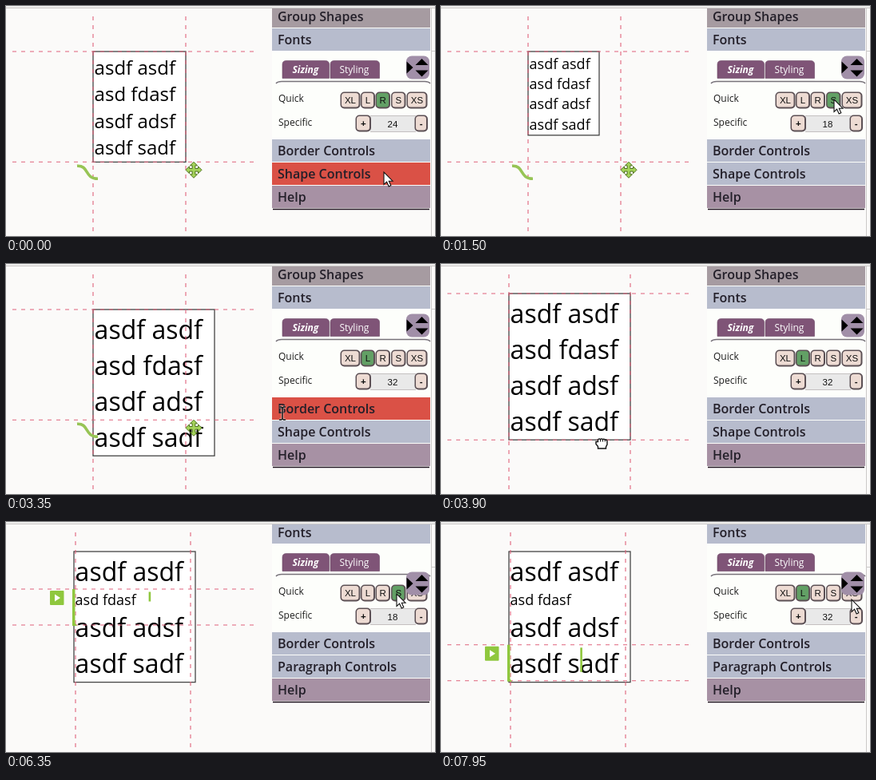
These frames come from a looping animation (537 px wide and 288 px high, 8 s). An HTML page:

```html
<!DOCTYPE html>
<html lang="en">
<head>
<meta charset="utf-8">
<title>Text sizing</title>
<style>
html, body { margin: 0; width: 100%; height: 100%; overflow: hidden; background: #fbfaf9; }
svg { display: block; width: 537px; height: 288px; font-family: "Open Sans", sans-serif; }
text { white-space: pre; }
.head { font-size: 16px; font-weight: 600; fill: #231f29; }
.label { font-size: 12px; fill: #1c1c1c; }
.tab { font-size: 12px; fill: #fff; }
.btn { font: 11.5px "Liberation Sans", Arial, sans-serif; text-anchor: middle; fill: #111; }
.guide { stroke: #e0637c; stroke-width: 1.1; stroke-dasharray: 5 6; fill: none; }
</style>
</head>
<body>
<svg id="stage" viewBox="0 0 537 288">
  <rect width="537" height="288" fill="#fbfaf9"/>
  <rect id="box" fill="#fff" stroke="#454545" stroke-width="1.3"/>
  <g id="lines"></g>
  <g id="guides"></g>
  <path id="curve" d="M-20 5C-5 4 -11 21 6 21" fill="none" stroke="#97c455" stroke-width="3.6"/>
  <path id="move" d="M0-10L4.5-5.5H1.8V-1.8H5.5V-4.5L10 0L5.5 4.5V1.8H1.8V5.5H4.5L0 10L-4.5 5.5H-1.8V1.8H-5.5V4.5L-10 0L-5.5-4.5V-1.8H-1.8V-5.5H-4.5Z"
    fill="#a5d45a" stroke="#4d6f1c" stroke-width="1"/>
  <g id="mark" fill="#8fc73e">
    <path d="M83 0H86.5V43L89 46H83Z"/>
    <rect x="55" y="2" width="17.5" height="18" rx="1"/>
    <path d="M61 6.5L68 11L61 15.500Z" fill="#fff"/>
  </g>
  <rect id="caret" width="2.6" fill="#8fc73e"/>

  <g id="panel"></g>
  <g id="widget">
    <rect x="501" y="62.500" width="29" height="29" rx="7" fill="#a18fa8"/>
    <path d="M501.500 69.500L509.500 77L501.500 84.500ZM512.500 74L520.500 66L528.500 74ZM512.500 80.500H528.500L520.500 88.500Z" fill="#000"/>
  </g>

  <rect width="537" height="2" fill="#f1f0ef"/>
  <path d="M0 2.500H537M532.500 3V288M533 56.500H537" stroke="#cbc9c8" fill="none"/>

  <g id="arrow"><path d="M0 0V15.500L3.600 12.200L6.200 18L8.800 16.800L6.300 11.200H11Z" fill="#fff" stroke="#111" stroke-width="1.1"/></g>
  <g id="beam" fill="none">
    <path d="M-4-8H-1.500L0-7L1.500-8H4M0-7V7M-4 8H-1.500L0 7L1.500 8H4" stroke="#fff" stroke-width="3" opacity=".6"/>
    <path d="M-4-8H-1.500L0-7L1.500-8H4M0-7V7M-4 8H-1.500L0 7L1.500 8H4" stroke="#111" stroke-width="1.5"/>
  </g>
  <g id="hand">
    <path d="M-4.500 6V3.500L-7 0.500V-2.500H-4.500V-5Q-3-7-1.500-5.300Q0-7 1.500-5.300Q3-6.500 4.300-4.800Q7-5.500 7-2.500V1L5.500 4V6Z" fill="#fff" stroke="#111" stroke-width="1.4"/>
    <path d="M-1.500-5V-2.500M1.500-5V-2.500M4.300-4.500V-2.500" stroke="#111"/>
  </g>
</svg>
<script>
const $ = id => document.getElementById(id);
const NS = "http://www.w3.org/2000/svg";

function add(parent, tag, attrs, text) {
  const el = document.createElementNS(NS, tag);
  set(el, attrs);
  if (text) el.textContent = text;
  return parent.appendChild(el);
}
function set(el, attrs) {
  for (const k in attrs) el.setAttribute(k, attrs[k]);
}
const show = (el, on) => set(el, { visibility: on ? "visible" : "hidden" });
const place = (el, x, y) => set(el, { transform: `translate(${x} ${y})` });
const lerp = (a, b, p) => a + (b - a) * p;
const span = (t, a, b) => Math.min(1, Math.max(0, (t - a) / (b - a)));
const swing = p => 0.5 - Math.cos(p * Math.PI) / 2;

// Panel
const panel = $("panel");
const BLUE = "#b7bccd", RED = "#da5146";

function row(y, name, fill) {
  const bar = add(panel, "rect", { x: 333, y, width: 198, height: 28, fill });
  const label = add(panel, "text", { x: 340, y: y + 20, class: "head" }, name);
  return { y, bar, label, fill };
}
function button(x, y, w, name, bold) {
  add(panel, "rect", { x, y, width: w, height: 21, rx: 5, fill: "#5c5055" });
  const face = add(panel, "rect", { x: x + 1.5, y: y + 1.5, width: w - 3.5, height: 17.5, rx: 3.5, fill: "#eddbd3" });
  add(panel, "text", { x: x + w / 2, y: y + 14.5, class: "btn", "font-weight": bold ? 700 : 400,
    style: bold ? "font-weight:700" : "" }, name);
  return face;
}

add(panel, "rect", { x: 333, y: -1, width: 198, height: 255, fill: "#fdfefb" });
const rows = [
  row(-1, "Group Shapes", "#a69ba1"),
  row(28, "Fonts", BLUE),
  row(167, "Border Controls", BLUE),
  row(196, "Shape Controls", BLUE),
  row(225, "Help", "#a791a4")
];
add(panel, "path", { d: "M334 254.500H530", stroke: "#1c0f1c", "stroke-width": 1.4 });
add(panel, "path", { d: "M338 97Q340 94.500 345 94.500H524Q529 94.500 531 97", fill: "none", stroke: "#77727a", "stroke-width": 1.5 });
for (const [x, w] of [[346, 58.5], [406, 61.5]])
  add(panel, "path", { d: `M${x} 90.500V73Q${x} 68.500 ${x + 5} 68.500H${x + w - 5}Q${x + w} 68.500 ${x + w} 73V90.500Z`, fill: "#7f5477", stroke: "#6a4563", "stroke-width": 0.6 });
add(panel, "text", { x: 358.5, y: 84, class: "tab", "font-weight": 700, "font-style": "italic" }, "Sizing");
add(panel, "text", { x: 417.5, y: 84, class: "tab" }, "Styling");
add(panel, "text", { x: 341, y: 120, class: "label" }, "Quick");
add(panel, "text", { x: 341, y: 149.5, class: "label" }, "Specific");

const quick = {
  XL: button(418.5, 107.5, 25, "XL"),
  32: button(444, 107.5, 18, "L"),
  24: button(462.5, 107.5, 18.5, "R"),
  18: button(482, 107.5, 18.5, "S"),
  XS: button(501.5, 107.5, 26, "XS")
};
add(panel, "rect", { x: 456, y: 137, width: 57, height: 21, fill: "#e9e9e9" });
add(panel, "path", { d: "M456 137.500H513M456 157.500H513", stroke: "#c4c0c0" });
button(437.5, 136.5, 19.5, "+", true);
button(511.5, 136.5, 16.5, "-", true);
const amount = add(panel, "text", { x: 484, y: 151.5, class: "btn" }, "24");

// Canvas
const words = ["asdf asdf", "asd fdasf", "asdf adsf", "asdf sadf"]
  .map(s => add($("lines"), "text", { fill: "#000" }, s));
const guides = [0, 1, 2, 3].map(() => add($("guides"), "path", { class: "guide" }));

// Pointer stops: time, x, y
const stops = [
  [0, 473, 208], [390, 473, 208], [950, 492, 117], [1780, 492, 117], [2100, 461, 116],
  [2299, 461, 116], [2300, 452, 116], [3199, 452, 116], [3200, 448, 116], [3349, 448, 116],
  [3350, 346, 187], [3399, 346, 187], [3560, 225, 245], [3600, 225, 245], [3890, 201, 225],
  [4140, 201, 225], [4350, 181, 113], [4890, 181, 113], [5500, 502, 90], [5599, 502, 90],
  [5600, 489, 90], [6440, 489, 90], [6600, 288, 150], [6850, 181.5, 178], [6999, 181.5, 178],
  [7000, 182.5, 177.5], [7190, 182.5, 177.5], [7940, 514, 97], [8000, 514, 97]
];
function pointer(t) {
  let i = 1;
  while (i < stops.length - 1 && t >= stops[i][0]) i++;
  const [a, x, y] = stops[i - 1], [b, u, v] = stops[i];
  const p = swing(span(t, a, b));
  return [lerp(x, u, p), lerp(y, v, p)];
}
function pointerKind(t, x) {
  if (t >= 3350 && t < 3400) return "beam";
  if (t >= 3560 && t < 4150) return "hand";
  return t >= 4200 && x < 237 ? "beam" : "arrow";
}

function draw(t) {
  const inText = t >= 4700, onLast = t >= 7150;
  const drag = swing(span(t, 3600, 3890));
  const bx = lerp(109, 85, drag), by = lerp(57, 37, drag);

  let size = lerp(24, 18, swing(span(t, 1170, 1500)));
  size = lerp(size, 32, swing(span(t, 2570, 3000)));
  const second = lerp(size, 18, swing(span(t, 5770, 6150)));

  let y = by + 2;
  const tops = words.map((el, i) => {
    const s = i === 1 ? second : size, top = y;
    set(el, { x: bx + 1.6, y: top + 1.088 * s + 0.4, "font-size": s });
    y += 1.4 * s;
    return top;
  });
  const w = 8 + 4.5 * size, h = y + 2 - by;
  set($("box"), { x: bx, y: by, width: w, height: h });

  // Guides: shape bounds, or bounds of the chosen paragraph
  const start = onLast ? tops[3] : 84;
  const g = inText ? [87, 231, start, start + 45]
    : t < 3560 ? [109, 225, 57, 195.3] : [bx, bx + w, by, by + h];
  guides.forEach((el, i) => set(el, { d: i < 2 ? `M${g[i]} 13V288` : `M8 ${g[i]}H314` }));

  const icons = !inText && (t < 3560 || t >= 4150);
  show($("curve"), icons);
  show($("move"), icons);
  place($("curve"), g[0], g[3]);
  place($("move"), g[1] + 10, g[3] + 10);

  show($("mark"), inText);
  show($("caret"), inText);
  place($("mark"), 0, start);
  set($("caret"), {
    x: onLast ? 174.3 : 178.6, y: start + 3.5,
    height: onLast ? 30.5 : lerp(12, 30.5, (second - 18) / 14)
  });

  // Panel state
  const value = t < 1200 ? 24 : t < 2600 ? 18 : t < 5800 ? 32 : onLast ? 32 : 18;
  for (const k in quick) set(quick[k], { fill: +k === value ? "#62a065" : "#eddbd3" });
  amount.textContent = value;
  const shift = inText ? -29 : 0;
  place(panel, 0, shift);
  rows[3].label.textContent = inText ? "Paragraph Controls" : "Shape Controls";

  const [px, py] = pointer(t);
  for (const r of rows) {
    const over = px > 333 && px < 531 && py >= r.y + shift && py < r.y + shift + 29;
    set(r.bar, { fill: over ? RED : r.fill });
  }
  const kind = pointerKind(t, px);
  for (const id of ["arrow", "beam", "hand"]) {
    show($(id), id === kind);
    place($(id), px, py);
  }
}

const begin = performance.now();
function tick() {
  draw((performance.now() - begin) % 8000);
  requestAnimationFrame(tick);
}
draw(0);
requestAnimationFrame(tick);
</script>
</body>
</html>
```
